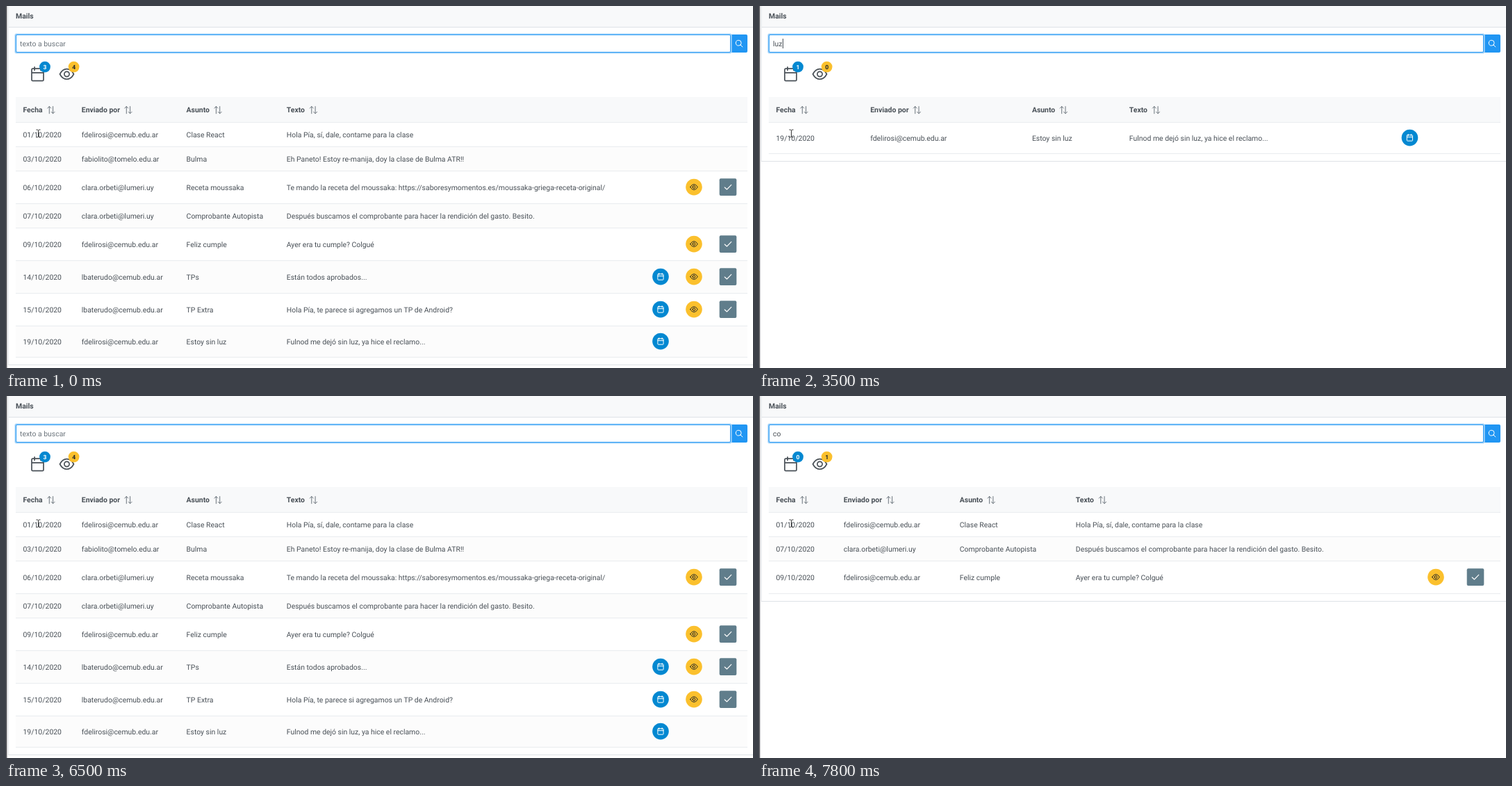
These frames come from a looping animation (1075 px wide and 521 px high, 8 s). An HTML page:

```html
<!DOCTYPE html>
<html lang="es">
<head>
<meta charset="utf-8">
<title>Mails</title>
<style>
  html, body { margin: 0; width: 1075px; height: 521px; overflow: hidden; background: #fff; }
  svg { display: block; }
  text { font: 10.43px Roboto, sans-serif; fill: #495057; text-rendering: geometricPrecision; white-space: pre; }
  .bold { font-weight: 700; }
  .badge { font-size: 8.6px; font-weight: 700; text-anchor: middle; }
  .icon { fill: none; stroke-linecap: round; stroke-linejoin: round; }
</style>
</head>
<body>
<svg id="stage" width="1075" height="521" viewBox="0 0 1075 521"></svg>
<script>
const LOOP = 8000;
const INK = '#495057', DARK = '#212529', BLUE = '#0288d1', AMBER = '#fbc02d', LINE = '#e9ecef';

// date, sender, subject, body, actions (c: calendar, e: eye, k: check)
const MAILS = [
  ['01/10/2020', 'fdelirosi@cemub.edu.ar', 'Clase React', 'Hola Pía, sí, dale, contame para la clase', ''],
  ['03/10/2020', 'fabiolito@tomelo.edu.ar', 'Bulma', 'Eh Paneto! Estoy re-manija, doy la clase de Bulma ATR!!', ''],
  ['06/10/2020', 'clara.orbeti@lumeri.uy', 'Receta moussaka', 'Te mando la receta del moussaka: https://saboresymomentos.es/moussaka-griega-receta-original/', 'ek'],
  ['07/10/2020', 'clara.orbeti@lumeri.uy', 'Comprobante Autopista', 'Después buscamos el comprobante para hacer la rendición del gasto. Besito.', ''],
  ['09/10/2020', 'fdelirosi@cemub.edu.ar', 'Feliz cumple', 'Ayer era tu cumple? Colgué', 'ek'],
  ['14/10/2020', 'lbaterudo@cemub.edu.ar', 'TPs', 'Están todos aprobados...', 'cek'],
  ['15/10/2020', 'lbaterudo@cemub.edu.ar', 'TP Extra', 'Hola Pía, te parece si agregamos un TP de Android?', 'cek'],
  ['19/10/2020', 'fdelirosi@cemub.edu.ar', 'Estoy sin luz', 'Fulnod me dejó sin luz, ya hice el reclamo...', 'c'],
];

// start time, search text, caret visible
const STEPS = [
  [0, '', 0], [400, '', 1], [600, 'l', 1], [1200, 'l', 0], [1800, 'lu', 1], [2400, 'lu', 0],
  [3100, 'lu', 1], [3500, 'luz', 1], [3900, 'lu', 1], [4000, 'l', 1], [4100, 'l', 0],
  [4300, '', 0], [4700, '', 1], [5300, '', 0], [5900, '', 1], [6500, '', 0],
  [6800, 'c', 1], [7200, 'co', 1], [7800, 'co', 0],
];
const CARET_X = { '': 20, l: 23, lu: 29, luz: 34, c: 26, co: 32 };

// The table columns adapt to the rows shown
const WIDE = { text: [24.5, 108.8, 259.6, 403.8], c: 942, e: 990, k: 1039 };
const SINGLE = { text: [24.5, 160.2, 392.9, 532.8], c: 936.5 };
const SHORT = { text: [24.5, 121.8, 288.8, 455.8], e: 974, k: 1031 };
const LAYOUTS = { lu: SINGLE, luz: SINGLE, co: SHORT };

const HEADS = [['Fecha', 35.3], ['Enviado por', 62], ['Asunto', 40.3], ['Texto', 33.5]];

const rect = (x, y, w, h, fill, r = 0) =>
  `<rect x="${x}" y="${y}" width="${w}" height="${h}" rx="${r}" fill="${fill}"/>`;
const circle = (x, y, r, fill) => `<circle cx="${x}" cy="${y}" r="${r}" fill="${fill}"/>`;
const text = (x, y, s, attrs = '') => `<text x="${x}" y="${y}" ${attrs}>${s}</text>`;
const icon = (x, y, d, color, width) =>
  `<path class="icon" transform="translate(${x} ${y})" d="${d}" stroke="${color}" stroke-width="${width}"/>`;

const calendarPath = s => {
  const p = (x, y) => `${x * s} ${y * s}`;
  return `M${p(-7, -8)}H${7 * s}Q${p(8.5, -8)} ${p(8.5, -6.5)}V${8 * s}Q${p(8.5, 9.5)} ${p(7, 9.5)}` +
    `H${-7 * s}Q${p(-8.5, 9.5)} ${p(-8.5, 8)}V${-6.5 * s}Q${p(-8.5, -8)} ${p(-7, -8)}Z` +
    `M${p(-8.5, -2)}H${8.5 * s}M${p(-4.4, -10.3)}V${-5.8 * s}M${p(4.4, -10.3)}V${-5.8 * s}`;
};
const eyePath = s => {
  const r = 3.6 * s;
  return `M${-10 * s} 0C${-5 * s} ${-9.8 * s} ${5 * s} ${-9.8 * s} ${10 * s} 0` +
    `C${5 * s} ${9.8 * s} ${-5 * s} ${9.8 * s} ${-10 * s} 0Z` +
    `M${-r} 0A${r} ${r} 0 1 1 ${r} 0A${r} ${r} 0 1 1 ${-r} 0Z`;
};
const SORT = 'M2.5 11V.8M0 3.3L2.5 .8L5 3.3M7.8 .8V11M5.3 8.5L7.8 11L10.3 8.5';

const ACTIONS = {
  c: (x, y) => circle(x, y, 11.8, BLUE) + icon(x, y, calendarPath(.48), '#fff', 1),
  e: (x, y) => circle(x, y, 11.8, AMBER) + icon(x, y, eyePath(.52), DARK, 1),
  k: (x, y) => rect(x - 12.3, y - 12.3, 24.6, 24.6, '#607d8b', 2) +
    icon(x, y, 'M-4.8 .4L-1.6 3.4L4.8 -3.2', '#fff', 1.1),
};

function frame() {
  return rect(0, 0, 1, 521, '#56565a') + rect(1, 0, 1, 521, '#b4b4b8') +
    rect(4, 0, 1071, 30, '#f8f9fa') + rect(3, 30, 1072, 1, '#dee2e6') +
    text(14, 18.3, 'Mails', 'class="bold"');
}

function searchBox(query, caret) {
  return rect(1043, 41, 24, 26, '#2196f3', 2) +
    icon(1055, 54, 'M-4.7 -.8A3.9 3.9 0 1 1 3.1 -.8A3.9 3.9 0 1 1 -4.7 -.8M2 2L4.9 4.9', '#fff', 1) +
    rect(12.4, 39.4, 1032.2, 29.2, '#a6d5fa', 3) + rect(14, 41, 1029, 26, '#2196f3', 2) +
    rect(15, 42, 1027, 24, '#fff', 1) +
    text(20, 57.7, query || 'texto a buscar', query ? '' : 'style="fill:#6c757d"') +
    (caret ? rect(CARET_X[query], 47, 1, 14, INK) : '');
}

function counters(mails) {
  const count = key => mails.filter(m => m[4].includes(key)).length;
  const badge = (x, n, fill, color) =>
    circle(x, 87.6, 7.9, fill) + text(x, 90.7, n, `class="badge" style="fill:${color}"`);
  return icon(45.5, 98.2, calendarPath(1), INK, 1.7) + icon(87.5, 98, eyePath(1), INK, 1.7) +
    badge(56, count('c'), BLUE, '#fff') + badge(97.6, count('e'), AMBER, DARK);
}

function table(mails, layout) {
  let out = rect(14, 131, 1053, 36, '#f8f9fa') + rect(14, 167, 1053, 1, LINE);
  HEADS.forEach(([label, gap], i) => {
    const x = layout.text[i];
    out += text(x, 153.4, label, 'class="bold"') + icon(x + gap, 143.8, SORT, '#6c757d', 1);
  });
  let y = 168;
  mails.forEach((mail, i) => {
    const actions = mail[4];
    const height = actions.includes('k') ? 47 : actions ? 45 : 35;
    const mid = y + (height - 1) / 2;
    if (i % 2) out += rect(14, y, 1053, height - 1, '#fcfcfc');
    out += rect(14, y + height - 1, 1053, 1, LINE);
    layout.text.forEach((x, col) => out += text(x, mid + 3.6, mail[col]));
    for (const key of actions) out += ACTIONS[key](layout[key], mid - .4);
    y += height;
  });
  return out + rect(3, y + 10, 1072, 1, '#dee2e6') + rect(3, 0, 1, y + 10, '#e4e7ea');
}

const pointer = () =>
  icon(46.5, 183.5, 'M-2.6 -5.5Q-.4 -5.5 0 -4.4Q.4 -5.5 2.6 -5.5M0 -4.4V4.4M-2.6 5.5Q-.4 5.5 0 4.4Q.4 5.5 2.6 5.5', '#333', 1);

const stage = document.getElementById('stage');
let shown;

function draw(time) {
  const step = STEPS.findLast(s => s[0] <= time % LOOP);
  if (step !== shown) {
    shown = step;
    const [, query, caret] = step;
    const mails = MAILS.filter(m => (m[2] + '\n' + m[3]).toLowerCase().includes(query));
    stage.innerHTML = frame() + searchBox(query, caret) + counters(mails) +
      table(mails, LAYOUTS[query] || WIDE) + pointer();
  }
}

const start = performance.now();
function tick() {
  draw(performance.now() - start);
  requestAnimationFrame(tick);
}
tick();
</script>
</body>
</html>
```
